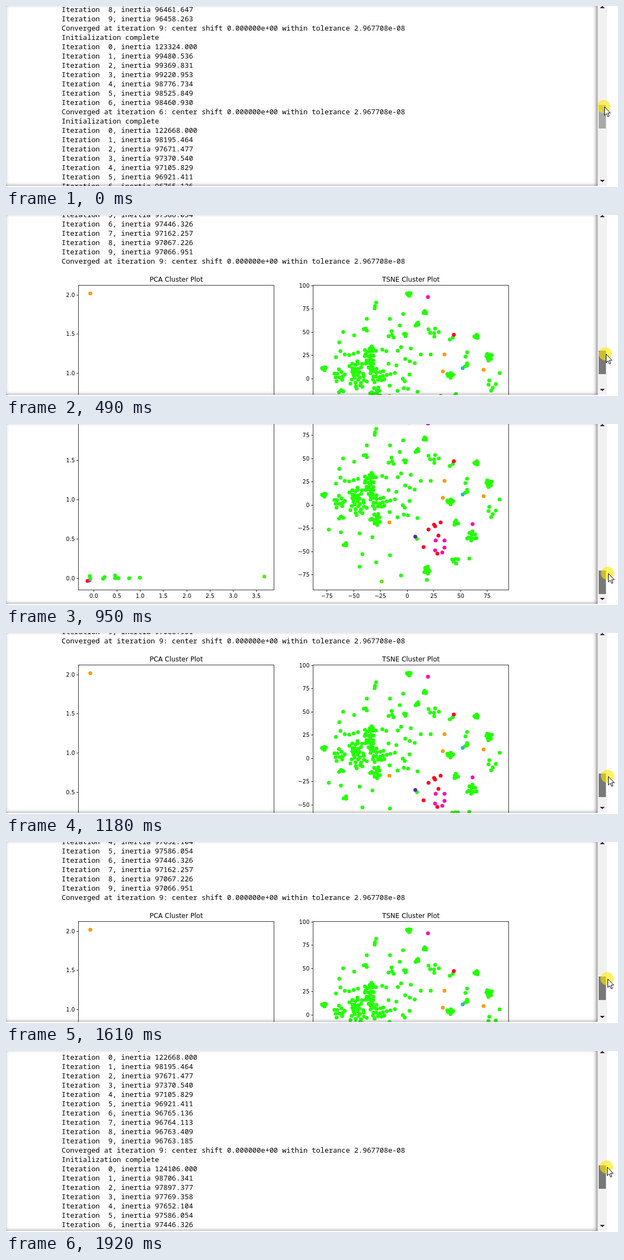
An HTML page with a canvas that plays this animation: 1111 px wide and 331 px high, repeating every 2000 ms.

```html
<!DOCTYPE html>
<html lang="en">
<head>
<meta charset="utf-8">
<title>Cluster output</title>
<style>
  html, body { margin: 0; width: 100%; height: 100%; overflow: hidden; background: #fff; }
  #stage { position: relative; width: 1111px; height: 331px; overflow: hidden; }
  canvas { position: absolute; left: 0; top: 0; display: block; }
  #shade {
    position: absolute; left: -4px; top: -7px; width: 1078px; height: 336px;
    box-shadow: inset 0 2px 8px rgba(0, 0, 0, .8);
  }
</style>
</head>
<body>
<div id="stage">
  <canvas id="view" width="1111" height="331"></canvas>
  <div id="shade"></div>
</div>
<script>
const ctx = document.getElementById('view').getContext('2d');
const LOOP = 2000, BOTTOM = 329;
const PLOT_Y = 664; // page offset of the point coordinates below

// The screen updates only at these times.
const ticks = [0, 90, 170, 260, 340, 420, 490, 570, 640, 720, 800, 870, 950,
  1100, 1180, 1250, 1320, 1390, 1460, 1530, 1610, 1680, 1760, 1840, 1920];

// [time, value] tracks
const scrollTrack = [[0, 0], [260, 216], [570, 622], [800, 664], [950, 668],
  [1100, 612], [1180, 587], [1460, 540], [1610, 500], [1760, 425], [1920, 216]];
const gripTrack = [[0, 3], [260, 6], [800, 5], [1460, 5], [1920, 3]];
const mouseTrack = [[260, 1085], [800, 1092], [1460, 1092], [1760, 1090]];

function sample(track, t) {
  if (t <= track[0][0]) return track[0][1];
  for (let i = 1; i < track.length; i++) {
    const [t0, a] = track[i - 1], [t1, b] = track[i];
    if (t <= t1) return a + (b - a) * (t - t0) / (t1 - t0);
  }
  return track[track.length - 1][1];
}

// Console text
const converged = n =>
  `Converged at iteration ${n}: center shift 0.000000e+00 within tolerance 2.967708e-08`;
const run = (first, ...values) => [
  ...values.map((v, i) => `Iteration  ${first + i}, inertia ${v.toFixed(3)}`),
  converged(first + values.length - 1)
];
const INIT = 'Initialization complete';
const lines = [
  run(8, 96461.647, 96458.263), INIT,
  run(0, 123324, 99480.536, 99369.831, 99220.953, 98776.734, 98525.849, 98460.930), INIT,
  run(0, 122668, 98195.464, 97671.477, 97370.540, 97105.829, 96921.411,
    96765.136, 96764.113, 96763.409, 96763.185), INIT,
  run(0, 124106, 98706.341, 97897.377, 97769.358, 97652.104, 97586.054,
    97446.326, 97162.257, 97067.226, 97066.951)
].flat();

// Scatter points
const GREEN = '#22ff00', RED = '#ff0022', PINK = '#ff00b4', ORANGE = '#ff9900', LIME = '#5ee80c';

const singles = [
  [672, 13], [655, 43], [697, 43], [721, 34], [715, 55], [612, 67], [632, 73], [605, 86],
  [683, 99], [753, 108], [771, 108], [837, 104], [834, 112], [896, 142], [698, 144],
  [724, 157], [742, 124], [747, 176], [586, 197], [608, 202], [642, 204], [665, 211],
  [647, 242], [672, 257], [642, 265], [697, 244], [746, 214], [717, 281], [764, 289], [841, 250]
];

// [x, y, radius, count]
const clumps = [
  [577, 134, 4, 6], [731, -2, 4, 5], [670, 22, 3, 2], [653, 62, 4, 3], [698, 72, 8, 4],
  [725, 72, 3, 3], [746, 53, 4, 4], [760, 31, 3, 5], [775, 67, 11, 6], [809, 77, 5, 2],
  [854, 75, 4, 6], [877, 113, 7, 8], [836, 128, 4, 3], [806, 146, 6, 7], [882, 165, 11, 5],
  [817, 185, 5, 5], [846, 210, 10, 10], [815, 255, 7, 5], [764, 271, 7, 8], [616, 225, 4, 3],
  [661, 105, 12, 14], [661, 126, 10, 11], [635, 131, 13, 14], [674, 146, 15, 16],
  [605, 147, 12, 10], [640, 157, 16, 17], [609, 175, 5, 3], [671, 178, 11, 12]
];

const tints = [
  [RED, [[813, 72], [777, 188], [779, 191], [789, 184], [767, 197], [785, 208], [758, 229], [783, 241]]],
  [PINK, [[766, 3], [847, 187], [780, 217], [796, 217], [796, 230], [779, 235], [792, 239]]],
  [ORANGE, [[796, 108], [793, 139], [867, 136], [696, 184], [153, -3.5]]],
  ['#2cb4cc', [[829, 133]]],
  ['#5526b8', [[743, 210]]],
  [LIME, [[682, 292], [469, 283]]]
];

const pca = [
  [RED, [[148, 291]]], [PINK, [[151, 290]]],
  [GREEN, [[152, 282], [153, 287], [176, 287], [179, 284], [198, 281],
    [198, 286], [204, 286], [223.5, 286], [243, 285]]]
];

let seed = 11;
function rand() {
  seed = (seed * 16807) % 2147483647;
  return seed / 2147483647;
}

// Spreads points evenly over a disc with a little jitter.
function scatter([x, y, r, n]) {
  const turn = rand() * 6.28;
  return Array.from({ length: n }, (_, i) => {
    const d = r * Math.sqrt((i + .3 + rand() * .7) / n), a = turn + i * 2.4 + rand() * .5;
    return [x + d * Math.cos(a), y + d * Math.sin(a)];
  });
}
const filled = clumps.flatMap(scatter);

// Thin filling between the dense left part and the middle
const sparse = Array.from({ length: 16 }, (_, i) =>
  [690 + (i % 4) * 13 + rand() * 9, 92 + Math.floor(i / 4) * 24 + rand() * 14]);
const leftRim = Array.from({ length: 6 }, (_, i) => [599 + i * 8, 100 - i + rand() * 14]);

function dots(color, points) {
  ctx.fillStyle = color;
  for (const [x, y] of points) {
    ctx.beginPath();
    ctx.arc(x, y + PLOT_Y, 3.5, 0, Math.PI * 2);
    ctx.fill();
  }
}

function label(text, x, y, align, size = 10) {
  ctx.font = `${size}px "DejaVu Sans", sans-serif`;
  ctx.textAlign = align;
  ctx.fillText(text, x, y);
}

function stroke(x0, y0, x1, y1) {
  ctx.beginPath();
  ctx.moveTo(x0, y0);
  ctx.lineTo(x1, y1);
  ctx.stroke();
}

const snap = v => Math.floor(v) + .5;

function axes(left, title, xs, ys, xPos, yPos, format) {
  const top = 645.5, base = 971.5;
  ctx.strokeStyle = ctx.fillStyle = '#000';
  ctx.lineWidth = .8;
  ctx.strokeRect(left, top, 355, base - top);
  label(title, left + 177.5, 639, 'center', 12);
  for (const v of xs) {
    const x = snap(xPos(v));
    stroke(x, base, x, base + 3.5);
    label(format(v), x, 986, 'center');
  }
  for (const v of ys) {
    const y = snap(yPos(v));
    stroke(left - 3.5, y, left, y);
    label(format(v), left - 6.5, y + 3.5, 'right');
  }
}

const steps = (from, by, n) => Array.from({ length: n }, (_, i) => from + by * i);

function page(scroll) {
  ctx.save();
  ctx.beginPath();
  ctx.rect(0, 0, 1074, BOTTOM);
  ctx.clip();
  ctx.translate(0, -scroll);
  ctx.fillStyle = '#000';
  ctx.textAlign = 'left';
  ctx.font = '12.83px "Noto Sans Mono", "DejaVu Sans Mono", monospace';
  lines.forEach((s, i) => ctx.fillText(s, 101, 11 + 17 * i));

  pca.forEach(([c, p]) => dots(c, p));
  [singles, filled, sparse, leftRim].forEach(p => dots(GREEN, p));
  tints.forEach(([c, p]) => dots(c, p));

  axes(131.5, 'PCA Cluster Plot', steps(0, .5, 8), steps(0, .5, 5),
    v => 159 + 84.57 * v, v => 950 - 143.5 * v, v => v.toFixed(1));
  axes(557.5, 'TSNE Cluster Plot', steps(-75, 25, 7), steps(-75, 25, 8),
    v => 728 + 1.94 * v, v => 816 - 1.7 * v, v => String(v).replace('-', '\u2212'));
  ctx.restore();
}

function shape(points) {
  ctx.beginPath();
  points.forEach(([x, y]) => ctx.lineTo(x, y));
  ctx.closePath();
}

function scrollbar(thumb, held) {
  ctx.fillStyle = '#f1f1f1';
  ctx.fillRect(1074, 0, 17, BOTTOM);
  ctx.fillStyle = held ? '#787878' : '#a8a8a8';
  ctx.fillRect(1076, thumb, 13, 43);
  ctx.fillStyle = '#3b0d3b';
  shape([[1078, 4], [1082.5, 0], [1087, 4]]);
  ctx.fill();
  shape([[1078, 318], [1082.5, 322], [1087, 318]]);
  ctx.fill();
}

function pointer(x, y) {
  ctx.fillStyle = 'rgba(255, 232, 0, .62)';
  ctx.beginPath();
  ctx.arc(x, y, 12, 0, Math.PI * 2);
  ctx.fill();
  ctx.save();
  ctx.translate(x + 1.5, y + .5);
  shape([[0, 0], [0, 15.5], [3.5, 12.2], [6, 18], [8.4, 17], [6, 11.3], [10.8, 11.3]]);
  ctx.fillStyle = '#fff';
  ctx.strokeStyle = '#000';
  ctx.lineWidth = 1;
  ctx.fill();
  ctx.stroke();
  ctx.restore();
}

function draw(now) {
  const time = now % LOOP;
  const t = ticks.filter(k => k <= time).pop() || 0;
  const scroll = Math.round(sample(scrollTrack, t));
  const thumb = Math.round(181 + scroll * .1295);
  ctx.fillStyle = '#fff';
  ctx.fillRect(0, 0, 1111, 331);
  page(scroll);
  scrollbar(thumb, t > 0);
  pointer(Math.round(sample(mouseTrack, t)), thumb + Math.round(sample(gripTrack, t)));
}

const start = performance.now();
function loop() {
  draw(performance.now() - start);
  requestAnimationFrame(loop);
}
loop();
</script>
</body>
</html>
```
